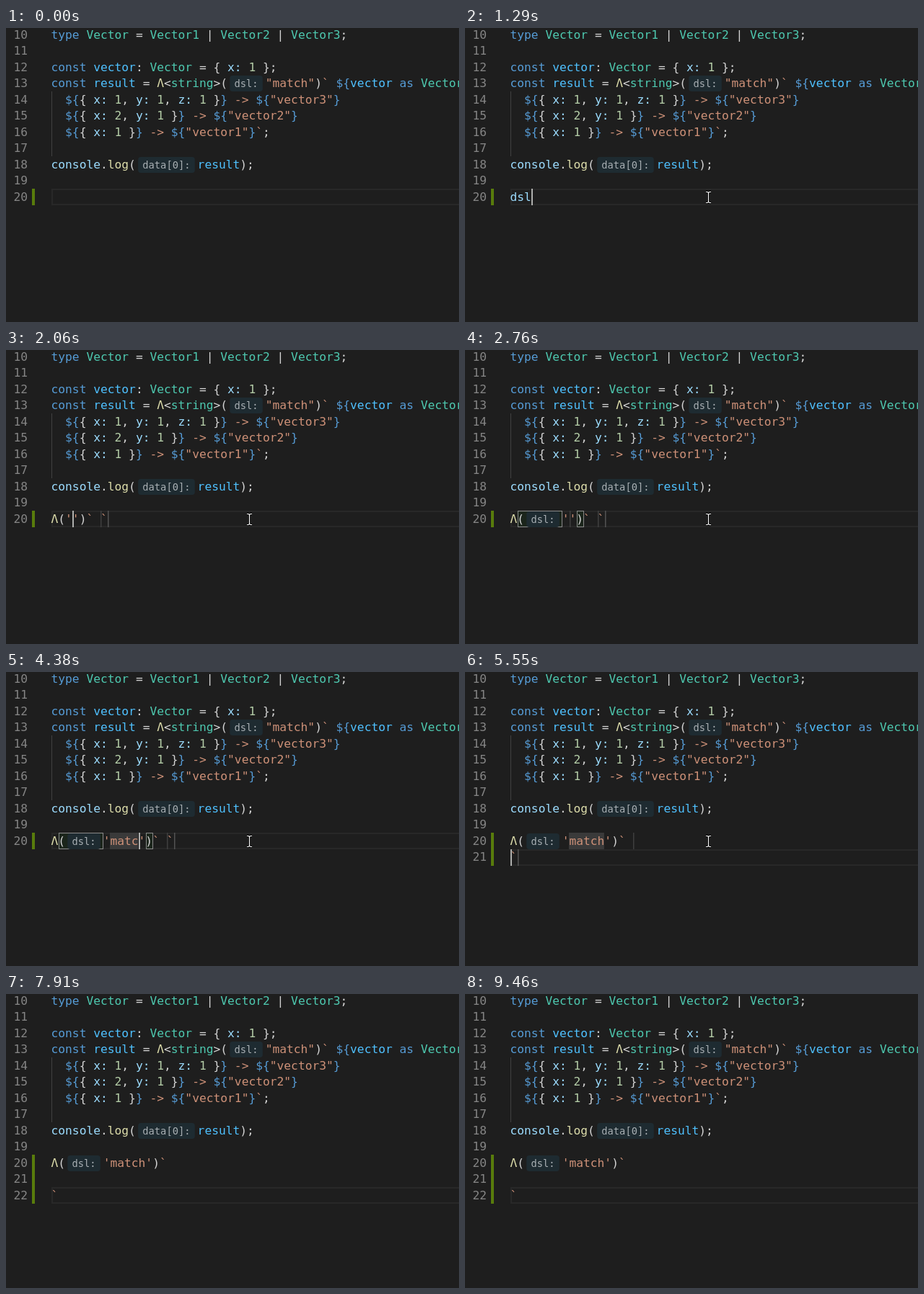
An HTML page with a canvas that plays this animation: 628 by 408 pixels, repeating every 9.62 s.

```html
<!DOCTYPE html>
<html lang="en">
<head>
<meta charset="utf-8">
<title>Snippet completion</title>
<style>
  html, body { margin: 0; height: 100%; overflow: hidden; background: #1e1e1e; }
  canvas { display: block; }
</style>
</head>
<body>
<canvas id="stage" width="628" height="408"></canvas>
<script>
const g = document.getElementById('stage').getContext('2d');
const LOOP = 9620, LEFT = 62.5, ROW = 22.5, SIZE = 16.25, CHAR = SIZE * 0.602;
const HINT_SIZE = 13.75, HINT_CHAR = HINT_SIZE * 0.602;
const MONO = '"DejaVu Sans Mono", monospace';

// One-letter colour keys; a line is a list of "key + text" runs joined by "~".
const COLOR = {
  k: '#569cd6', t: '#4ec9b0', w: '#d4d4d4', v: '#9cdcfe', c: '#4fc1ff',
  n: '#b5cea8', s: '#ce9178', f: '#dcdcaa', l: '#858585', m: '#0097fb', d: '#a0a0a0'
};
const point = (...fields) => 'k${~w{ ' +
  fields.map(([name, value]) => `~v${name}:~w ~n${value}`).join('~w, ') + '~w }~k}';
const arm = (fields, name, end) => `w  ~${point(...fields)}~s -> ~k\${~s"${name}"~k}~${end}`;
const CODE = [
  'ktype~w ~tVector~w = ~tVector1~w | ~tVector2~w | ~tVector3~w;',
  '',
  'kconst ~cvector~w: ~tVector~w = { ~vx:~w ~n1~w };',
  'kconst ~cresult~w = ~fΛ~w<~tstring~w>(~hdsl:~s"match"~w)~s` ~k${~cvector~k as ~tVector~k}',
  arm([['x', 1], ['y', 1], ['z', 1]], 'vector3', 's'),
  arm([['x', 2], ['y', 1]], 'vector2', 's'),
  arm([['x', 1]], 'vector1', 's`~w;'),
  '',
  'vconsole~w.~flog~w(~hdata[0]:~cresult~w);'
];
const ITEMS = ['mdsl', 'mDSL~wPlugin', 'wMatch~mDSL', 'md~wefau~ml~wt~mS~wtatus',
  'mD~wOM~mS~wtring~mL~wist', 'mD~wOMRect~mL~wi~ms~wt', 'mD~wOMToken~mL~wi~ms~wt'];

const BLINKS = [280, 740, 1140, 1830, 2060, 2760, 3220, 3910, 4380, 5160, 5400,
  6340, 6800, 7670, 8140, 8600, 9070, 9460];
const WORD_KEYS = [1140, 1220, 1290], ARG_KEYS = [3220, 3370, 3450, 4380, 4450];
const POPUP = 1370, DETAILS = 1680, ACCEPT = 2060, BRACKETS = 2140, HINT = 2290;
const TAB = 4690, ENTERS = [5400, 5720], GUTTERS = [5480, 5870], DONE = 7200;
// time, x, y of the pointer; a missing place hides it
const POINTER = [
  [0], [120, 423, 287], [200, 418, 274], [350, 404, 258], [430, 389, 244], [510, 372, 234],
  [590, 356, 228], [660, 344, 230], [820, 337, 235], [6800, 331, 244], [6880, 312, 264],
  [6960, 291, 281], [7040, 278, 290], [7120, 276, 295], [7510, 306, 303],
  [7590, 372, 325], [7670, 450, 350], [7740, 520, 372], [7820]
];

const passed = (times, t) => times.filter(x => x <= t).length;
const lineTop = line => -2 + ROW * (line - 10);
const base = line => Math.round(lineTop(line) + 16.9);

function rect(color, x, y, w, h) {
  g.fillStyle = color;
  g.fillRect(x, y, w, h);
}

function path(color, width, ...lines) {
  g.strokeStyle = color;
  g.lineWidth = width;
  g.beginPath();
  for (const p of lines)
    for (let i = 0; i < p.length; i += 2) g[i ? 'lineTo' : 'moveTo'](p[i], p[i + 1]);
  g.stroke();
}

function outline(color, x, y, w, h, width = 1) {
  g.strokeStyle = color;
  g.lineWidth = width;
  g.strokeRect(x + width / 2, y + width / 2, w - width, h - width);
}

function chars(text, x, y, step) {
  for (const ch of text) {
    if (ch !== ' ') g.fillText(ch, x, y);
    x += step;
  }
  return x;
}

function hint(text, x, y) {
  const w = text.length * HINT_CHAR + 12.5;
  g.fillStyle = '#1e2b31';
  g.beginPath();
  g.roundRect(x + 3.2, y - 16, w, 22, 4);
  g.fill();
  g.font = `${HINT_SIZE}px ${MONO}`;
  g.fillStyle = '#a8afb3';
  chars(text, x + 9.4, y, HINT_CHAR);
  return x + w + 7;
}

function write(runs, x, y) {
  for (const run of runs.split('~')) {
    const key = run[0], text = run.slice(1);
    if (key === 'h') { x = hint(text, x, y); continue; }
    g.font = `${key === 'm' ? 'bold ' : ''}${SIZE}px ${MONO}`;
    g.fillStyle = COLOR[key];
    x = chars(text, x, y, CHAR);
  }
  return x;
}

const bar = (x, line, color = '#3f3f3f') =>
  rect(color, Math.ceil(x), Math.round(lineTop(line)), 1.5, 23);

function snippetIcon(y) {
  path('#c5c5c5', 1.6, [98, y + 16, 98, y + 4, 113.5, y + 4, 113.5, y + 16]);
  for (let x = 97; x < 114; x += 3) rect('#c5c5c5', x, y + 18, 1.6, 1.6);
}

function classIcon(y) {
  const diamond = (x, y, r) => [x - r, y, x, y - r, x + r, y, x, y + r, x - r, y];
  path('#ee9d28', 1.5, diamond(101, y + 8, 4), diamond(110.5, y + 8.5, 2.5),
    diamond(110.5, y + 16, 2.5), [104, y + 9, 108, y + 9], [105, y + 9, 105, y + 16, 108, y + 16]);
}

function variableIcon(y) {
  path('#75beff', 1.4, [100, y + 5, 97, y + 5, 97, y + 17, 100, y + 17],
    [110, y + 5, 113, y + 5, 113, y + 17, 110, y + 17],
    [101, y + 10, 106, y + 7.5, 109, y + 9, 109, y + 12, 104, y + 14.5, 101, y + 13, 101, y + 10, 104, y + 11.3, 109, y + 9],
    [104, y + 11.3, 104, y + 14.5]);
}

function popup(details) {
  rect('#252526', 91, 246, 413, 170);
  rect('#062f4a', 92, 247, 411, ROW);
  outline('#454545', 91, 246, 413, 170);
  ITEMS.forEach((item, i) => {
    const y = 247 + i * ROW;
    [snippetIcon, classIcon, variableIcon][Math.min(i, 2)](Math.round(y));
    write(item, 120, Math.round(y + 16.9));
  });
  write('duse dsl in type…', 324.5, 264);
  if (!details) return;
  rect('#252526', 504, 246, 140, 99);
  outline('#454545', 503, 246, 140, 99);
  write('duse dsl in types', 511, 268);
  write('dpet)', 511, 290);
  write("fΛ~w(~s''~w)~s` `", 511, 332);
}

function squiggle() {
  const p = [];
  for (let i = 0; i <= 8; i++) p.push(63 + i * 3.6, i % 2 ? 242 : 245);
  path('#f14c4c', 1.3, p);
}

function pointer(x, y) {
  const beam = [[x - 3, y - 7.5, x - 1, y - 7.5, x + .5, y - 6.5, x + 2, y - 7.5, x + 4, y - 7.5],
    [x + .5, y - 6.5, x + .5, y + 6.5],
    [x - 3, y + 7.5, x - 1, y + 7.5, x + .5, y + 6.5, x + 2, y + 7.5, x + 4, y + 7.5]];
  path('#000', 3, ...beam);
  path('#fff', 1.2, ...beam);
}

// The snippet line and its tab stops; returns where the caret stands.
function snippet(t, rows) {
  const arg = 'match'.slice(0, passed(ARG_KEYS, t));
  const y = base(20), last = 20 + rows, live = t < DONE;
  const open = LEFT + 2 * CHAR;
  const quote = open + (t >= HINT ? 4 * HINT_CHAR + 19.5 : 0);
  const start = quote + CHAR, end = start + arg.length * CHAR, stop = end + 4 * CHAR;
  const tail = rows ? LEFT : stop;

  if (live) {
    if (arg) rect('#3a3a3a', Math.round(start), 223, end - start, 23);
    else bar(start, 20);
    bar(stop, 20);
    if (rows > 1) bar(LEFT, 21);
    bar(tail + CHAR, last, '#525252');
  }
  if (t >= BRACKETS && t < TAB) {
    const box = (a, b) => {
      rect('rgba(0,100,0,.1)', a, 223, b - a, 23);
      outline('#888', Math.round(a) + 1, 223, Math.round(b - a), 23);
    };
    box(open - CHAR, quote);
    box(end + CHAR, end + 2 * CHAR);
  }
  write(`fΛ~w(~${t >= HINT ? 'hdsl:~' : ''}s'${arg}'~w)~s\``, LEFT, y);
  write('s`', tail, base(last));
  return t < TAB ? end : live ? tail : tail + CHAR;
}

function draw(t) {
  rect('#1e1e1e', 0, 0, 628, 408);
  const rows = passed(ENTERS, t), line = 20 + rows;
  outline('#282828', 63, Math.round(lineTop(line)), 600, 23, 2);
  rect('#404040', 63, 88, 1, 90);
  rect('#587c0c', 36, 223, 4, Math.round(23 + passed(GUTTERS, t) * ROW));
  for (let n = 10; n <= line; n++) write('l' + n, 10.4, base(n));
  CODE.forEach((runs, i) => runs && write(runs, LEFT, base(10 + i)));

  let caret;
  if (t < ACCEPT) {
    caret = write('v' + 'dsl'.slice(0, passed(WORD_KEYS, t)), LEFT, base(20));
    if (t >= DETAILS) squiggle();
  } else caret = snippet(t, rows);
  if (passed(BLINKS, t) % 2) rect('#aeafad', Math.ceil(caret), Math.round(lineTop(line)), 2, 23);
  if (t >= POPUP && t < ACCEPT) popup(t >= DETAILS);

  const [, x, y] = POINTER[passed(POINTER.map(p => p[0]), t) - 1];
  if (x) pointer(x, y);
}

const begin = performance.now();
function tick() {
  draw((performance.now() - begin) % LOOP);
  requestAnimationFrame(tick);
}
tick();
</script>
</body>
</html>
```
